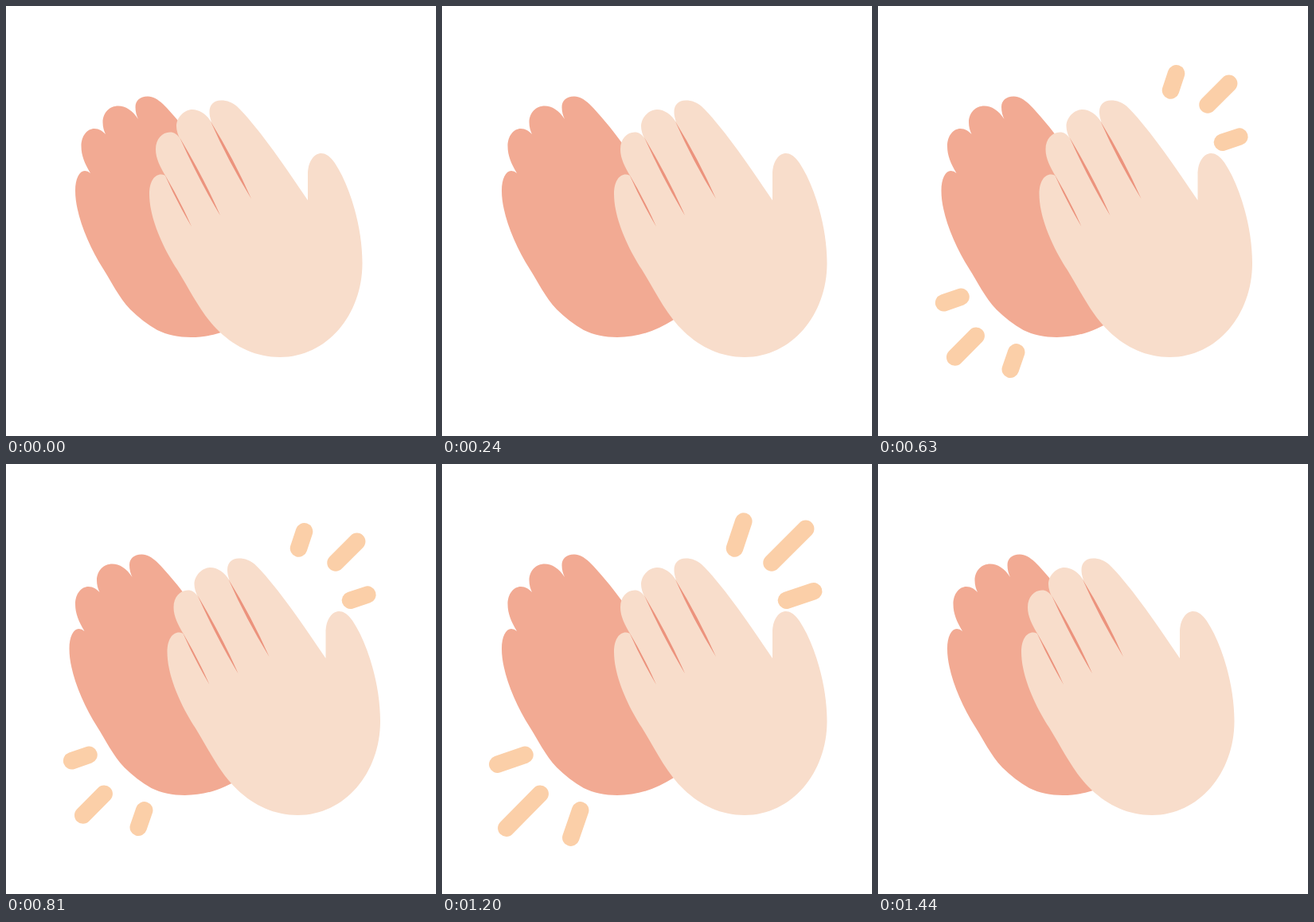
These frames come from a looping animation (540x540 px, 1800 ms). An HTML page:

```html
<!DOCTYPE html>
<html lang="en">
<head>
<meta charset="utf-8">
<title>Clapping hands</title>
<style>
  html, body { margin: 0; height: 100%; overflow: hidden; background: #fff; }
  svg { display: block; width: 100%; height: 100%; }
</style>
</head>
<body>
<svg viewBox="0 0 540 540">
  <path id="back" fill="#f2aa93" d="M238 172C224 153 211 137 197 123C190 117 185 113.5 178 113.5
    C168 113.5 162.5 119 162.5 127C162.5 133 164 138 166 142C159 131 150 125.5 141 125.5
    C130 125.5 121.5 134 121.5 146C121.5 152 123 157 125 161C121 157 117 154 111 154
    C102 154 94.5 163 94.5 176C94.5 188 99 198 106 210Q103 207 99 207C92 207 87 217 87 232
    C87 261 103 300 122 330C133 347 141 365 156 381C166 391 178 400 190 407
    C202 413 217 416 232 416C258 416 281 408 303 394L335 350L300 255Z"/>
  <g id="front">
    <path fill="#f8ddcb" d="M379 244V212C379 195 387 185 396 185C406 185 414 197 422 213
      C437 244 447.5 285 447.5 323C447.5 388 403 441 344 441C315 441 289 429 268 409
      C246 388 234 362 215 331C198 305 180 267 180 236C180 221 186 211.5 195 211.5Q198 211.5 200 213
      C194 202 188 192 188 180C188 167 196 158.5 206 158.5C211 158.5 215 161 218 166
      C216 162 214 156 214 151C214 140 224 130 234 130C243 130 252 136 258 146
      C256 140 255.5 136 255.5 133C255.5 124 261 118.5 270 118.5C278 118.5 284 121 290 126
      C312 147 345 193 379 244Z"/>
    <path fill="#ec937d" d="M257 145Q286 192 308 242Q279 195 257 145Z
      M218 165Q249 217 269 263Q243 220 218 165Z
      M199 211Q218 243 233 277Q214 245 199 211Z"/>
  </g>
  <g id="rays" stroke="#fbcfa8" stroke-width="21.5" stroke-linecap="round"></g>
</svg>
<script>
const LOOP = 1800, STEP = 30, CLAP = 480, CLAPS = 3;
const [back, front, rays] = ['back', 'front', 'rays'].map(id => document.getElementById(id));

// Inner end of each ray and its full extent: x, y, dx, dy
const lines = [
  [367.5, 106, 11.3, -34],
  [414, 124, 42.7, -42.7],
  [432.5, 171.2, 34.2, -11.4],
  [104, 365.3, -34.2, 11.9],
  [123.2, 414.2, -42.4, 43],
  [173.7, 434.8, -11.9, 34.4]
].map(([x, y, dx, dy]) => {
  const el = document.createElementNS('http://www.w3.org/2000/svg', 'line');
  el.setAttribute('x1', x);
  el.setAttribute('y1', y);
  rays.append(el);
  return { el, x, y, dx, dy };
});

function draw(time) {
  const t = Math.floor((time % LOOP) / STEP) * STEP;
  // Distance between the hands: 0 touching, 1 fully apart
  const open = t < CLAP * CLAPS ? 1 - Math.abs(1 - (t % CLAP) / (CLAP / 2)) : 0;
  front.setAttribute('transform', `translate(${36 * open})`);
  back.setAttribute('transform', `translate(${-12 * open})`);

  // The rays only follow the second and third claps
  rays.setAttribute('visibility', t > CLAP && open > 0 ? 'visible' : 'hidden');
  for (const { el, x, y, dx, dy } of lines) {
    el.setAttribute('x2', x + dx * open);
    el.setAttribute('y2', y + dy * open);
  }
}

function tick() {
  draw(performance.now());
  requestAnimationFrame(tick);
}
tick();
</script>
</body>
</html>
```
